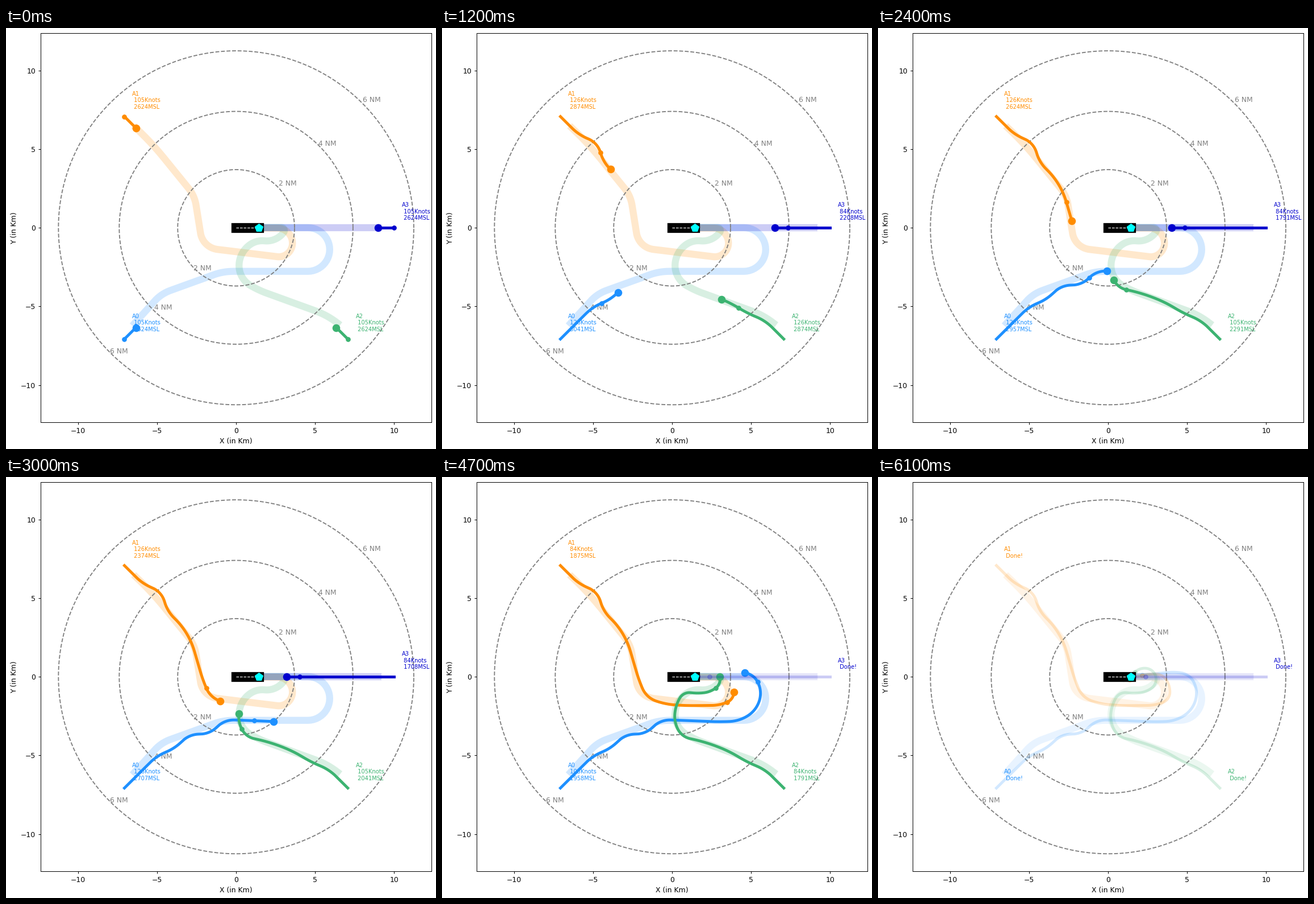
A matplotlib script for the animation above (6200 ms loop, 757 px wide and 740 px high).

```python
import itertools

import numpy as np
import matplotlib.pyplot as plt
from matplotlib.animation import FuncAnimation

W, H, DPI = 757, 740, 88.8
FRAMES, INTERVAL = 62, 100
HOLDS = (55, 58)            # ticks on which nobody moves
SAMPLES = 24
GOAL = 1.45
KM_PER_KNOT = 1.236 / 126   # distance flown in one leg
FULL_BANK = 45 * 126        # degrees turned in one leg, times knots
BASE_ALT, ALT_STEP = 2624.7, 83.28


def fly(start, heading, steps):
    """Chain of arcs, each given as (length, degrees turned)."""
    mid = (np.arange(SAMPLES) + 0.5) / SAMPLES
    moves = [start]
    for length, turn in steps:
        a = np.radians(heading + turn * mid)
        moves.extend(np.c_[np.cos(a), np.sin(a)] * length / SAMPLES)
        heading += turn
    return np.cumsum(moves, axis=0)


def speed_at(speeds, leg):
    return [v for first, v in speeds if leg >= first][-1]


class Plane:
    """Flies one leg, straight or banked, whenever its turn comes."""

    def __init__(self, name, color, bearing, banks, speeds, levels, route):
        self.name, self.speeds = name, speeds
        self.levels = np.array(levels).T
        self.legs = len(banks)
        knots = [speed_at(speeds, leg) for leg in range(1, self.legs + 1)]
        a = np.radians(bearing)
        x, y = start = 10 * np.cos(a), 10 * np.sin(a)
        self.curve = fly(start, bearing + 180,
                         [(v * KM_PER_KNOT, b * FULL_BANK / v) for v, b in zip(knots, banks)])
        self.nodes = self.curve[::SAMPLES]

        self.route, = ax.plot(*fly(*route).T, color=color, lw=10, zorder=1.5)
        self.trail, = ax.plot([], [], color=color, lw=4, zorder=4)
        self.last, = ax.plot([], [], "o", color=color, ms=6, zorder=4)
        self.now, = ax.plot([], [], "o", color=color, ms=10, zorder=4)
        self.label = ax.text(x + 0.5, y + 0.5, "", color=color, fontsize=8)

    def status(self, n):
        level = np.rint(np.interp(n, *self.levels))
        return f"{speed_at(self.speeds, n)}Knots\n {int(BASE_ALT + ALT_STEP * level)}MSL"

    def update(self, n):
        done = n == self.legs
        self.trail.set_data(*self.curve[:n * SAMPLES + 1].T)
        self.last.set_data(*self.nodes[n - 1:n].T)
        self.now.set_data(*self.nodes[n:n + 1].T)
        for art in (self.trail, self.last, self.now):
            art.set_alpha(0.2 if done else 1)
        self.route.set_alpha(0.1 if done else 0.2)
        self.label.set_text(f"{self.name}\n {'Done!' if done else self.status(n)}")


def schedule(planes):
    """Legs flown by each plane at every tick; finished planes drop out."""
    flown = [1] * len(planes)
    turn = itertools.cycle(range(len(planes)))
    ticks = [tuple(flown)]
    for tick in range(1, FRAMES):
        if tick not in HOLDS:
            for k in itertools.islice(turn, len(planes)):
                if flown[k] < planes[k].legs:
                    flown[k] += 1
                    break
        ticks.append(tuple(flown))
    return ticks


# The 0.001 keeps rounding from losing a pixel.
fig = plt.figure(figsize=((W + 0.001) / DPI, (H + 0.001) / DPI), dpi=DPI)
ax = fig.add_axes([61 / W, 46.6 / H, 688.2 / W, 684.4 / H])
ax.set(xlim=(-12.375, 12.375), ylim=(-12.375, 12.375),
       xlabel="X (in Km)", ylabel="Y (in Km)")

# Range rings
theta = np.linspace(0, 2 * np.pi, 361)
for miles, radius, pos in ((2, 3.7, 2.7), (4, 7.4, 5.2), (6, 11.25, 8)):
    ax.plot(radius * np.cos(theta), radius * np.sin(theta), "--", color="gray", lw=1.5)
    for s in (1, -1):
        ax.text(s * pos, s * pos, f"{miles} NM", color="gray")

# Runway
ax.plot([0, GOAL], [0, 0], color="black", lw=14, zorder=5)
ax.plot([0, GOAL], [0, 0], "--", color="white", lw=1, zorder=6)
ax.plot([GOAL], [0], "p", color="cyan", ms=12, zorder=7)

planes = [
    Plane("A0", "dodgerblue", -135,
          banks=[0, 0, -.5, .5, -1, 1, -1.05, 0, 0, .1, .67, .9, 1, 1, .2, 0, 0, 0],
          speeds=[(1, 105), (2, 126), (14, 105), (15, 84)],
          levels=[(1, 0), (4, 5), (6, 5), (9, 1), (11, -2), (14, -8)],
          route=((-6.42, -6.06), 48,
                 [(1.9, 0), (1.2, -28), (2.9, 0), (1.3, -20), (4.7, 0), (4.36, 180),
                  (3.1, 0)])),
    Plane("A1", "darkorange", 135,
          banks=[0, .5, -1.15, .67, -.33, -.33, 0, .15, 1.07, .33, .1, 0, .4, 1,
                 .5, .83, .2, 0],
          speeds=[(1, 105), (2, 126), (12, 105), (14, 84)],
          levels=[(1, 0), (4, 3), (10, -4), (14, -9)],
          route=((-6.33, 6.33), -43,
                 [(2.55, -8), (2.5, 0), (1.2, -30), (1.8, 0), (1.6, 74), (3.8, 0),
                  (1.49, 98), (1.48, 89), (1.17, 0)])),
    Plane("A2", "mediumseagreen", -45,
          banks=[0, .5, -.2, .2, .1, .1, -.95, -.6, -.45, -1, .2, .45, 1, 1, .8, -.6],
          speeds=[(1, 105), (2, 126), (5, 105), (10, 84)],
          levels=[(1, 0), (4, 3), (5, 1), (8, -7), (10, -9), (13, -10)],
          route=((6.41, -6.05), 142,
                 [(1.6, 18), (3.2, 0), (1.2, -10), (1.7, -66), (1.44, -50), (0.93, -40),
                  (1.4, 60), (0.42, 126), (1.4, 0)])),
    Plane("A3", "mediumblue", 0,
          banks=[0] * 10,
          speeds=[(1, 105), (2, 84)],
          levels=[(1, 0), (4, -5), (8, -11)],
          route=((8.97, 0), 180, [(8.97 - GOAL, 0)])),
]
ticks = schedule(planes)


def draw(i):
    for plane, n in zip(planes, ticks[i]):
        plane.update(n)


anim = FuncAnimation(fig, draw, frames=FRAMES, interval=INTERVAL,
                     init_func=lambda: draw(0), repeat=True, repeat_delay=0)
plt.show()
```
